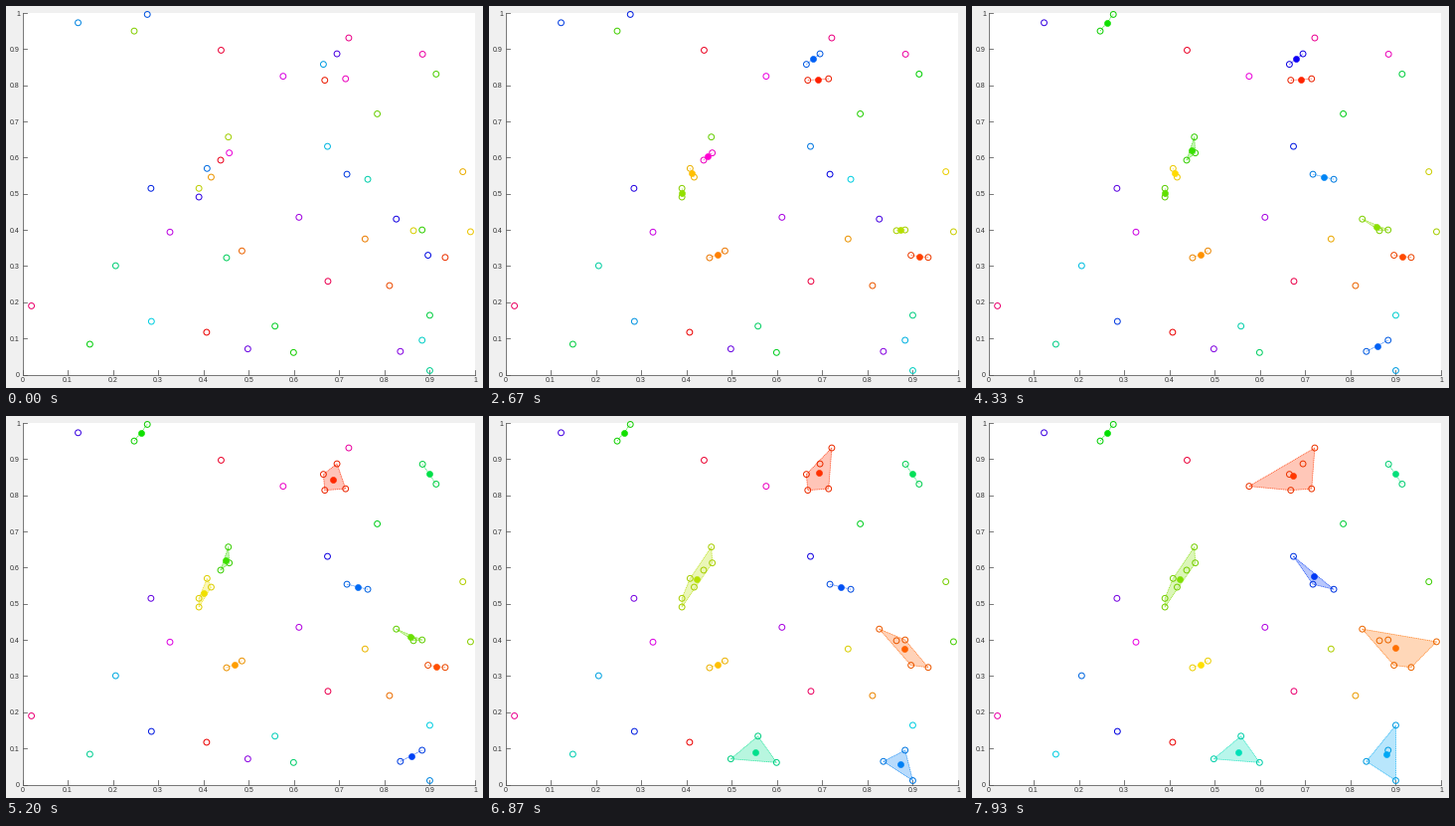
Animation of 480 by 384 pixels, one loop 8 s. Source, as a matplotlib script:

```python
import colorsys

import matplotlib.pyplot as plt
import numpy as np
from matplotlib.animation import FuncAnimation

W, H = 480, 384
LEFT, RIGHT, TOP, BOTTOM = 16.5, 472.0, 7.0, 370.5
LOOP_MS, STEP_MS = 8000, 50
FIRST_MS, MERGE_MS = 360, 285
MERGES = 26

# Sample points, ordered by their starting hue
POINTS = np.array([
    (.407, .117), (.668, .814), (.934, .324), (.811, .246), (.485, .342),
    (.757, .375), (.417, .546), (.973, .561), (.990, .395), (.864, .398),
    (.390, .515), (.455, .657), (.247, .950), (.784, .721), (.914, .831),
    (.883, .400), (.599, .061), (.149, .084), (.558, .134), (.900, .164),
    (.451, .323), (.206, .301), (.900, .011), (.763, .540), (.883, .095),
    (.285, .147), (.674, .631), (.665, .858), (.123, .973), (.408, .570),
    (.276, .996), (.717, .554), (.284, .515), (.896, .330), (.826, .430),
    (.390, .491), (.695, .887), (.498, .071), (.835, .064), (.611, .435),
    (.326, .394), (.576, .825), (.457, .613), (.714, .818), (.884, .886),
    (.721, .931), (.020, .190), (.675, .258), (.439, .897), (.438, .593),
])


def to_px(p):
    p = np.asarray(p, float)
    return np.column_stack((LEFT + p[:, 0] * (RIGHT - LEFT),
                            BOTTOM - p[:, 1] * (BOTTOM - TOP)))


def merge_closest(clusters):
    """Join the two clusters whose centroids are nearest."""
    mid = np.array([POINTS[c].mean(axis=0) for c in clusters])
    dist = np.hypot(*(mid[:, None] - mid[None]).transpose(2, 0, 1))
    np.fill_diagonal(dist, np.inf)
    a, b = sorted(np.unravel_index(dist.argmin(), dist.shape))
    joined = [list(c) for c in clusters]
    joined[a] += joined.pop(b)
    return joined


def half_hull(pts):
    out = []
    for p in pts:
        while len(out) > 1:
            (ax_, ay), (bx, by) = out[-2], out[-1]
            if (bx - ax_) * (p[1] - ay) - (by - ay) * (p[0] - ax_) > 0:
                break
            out.pop()
        out.append(p)
    return out[:-1]


def hull(pts):
    pts = sorted(map(tuple, pts))
    return np.array(half_hull(pts) + half_hull(pts[::-1]))


def hue_color(i, n, dim=1.0):
    r, g, b = colorsys.hsv_to_rgb(i / n, 1, 1)
    return (r * dim, g * .88 * dim, b * .96 * dim)


states = [[[i] for i in range(len(POINTS))]]
for _ in range(MERGES):
    states.append(merge_closest(states[-1]))

fig = plt.figure(figsize=(W / 72, H / 72), dpi=72, facecolor="#f0f0f0")
ax = fig.add_axes([0, 0, 1, 1])
ax.set_xlim(0, W)
ax.set_ylim(H, 0)
ax.axis("off")


def draw_axes():
    ax.fill([LEFT, RIGHT, RIGHT, LEFT], [TOP, TOP, BOTTOM, BOTTOM],
            color="white", lw=0, zorder=0)
    line = dict(color="#5a5a5a", lw=.8, zorder=1)
    ax.plot([LEFT, LEFT, RIGHT], [TOP, BOTTOM, BOTTOM], **line)
    ax.plot([0, W], [H - .5, H - .5], color="#8c8c8c", lw=1, zorder=1)
    text = dict(family="Liberation Sans", size=7, color="#303030")
    for k in range(11):
        label = f"{k / 10:g}"
        x, y = to_px([(k / 10, k / 10)])[0]
        ax.plot([x, x], [BOTTOM, BOTTOM - 4.5], **line)
        ax.plot([LEFT, LEFT + 4.5], [y, y], **line)
        ax.text(x, 376.8, label, ha="center", va="center", **text)
        ax.text(14, y, label, ha="right", va="center_baseline", **text)


draw_axes()
artists = []


def draw_cluster(members, i, n):
    pts = to_px(POINTS[members])
    color = hue_color(i, n)
    if len(members) > 1:
        shape = hull(pts)
        if len(shape) > 2:
            artists.extend(ax.fill(*shape.T, color=color, alpha=.28,
                                   lw=0, zorder=2))
        loop = np.vstack((shape, shape[:1])) if len(shape) > 2 else shape
        artists.extend(ax.plot(*loop.T, color=color, lw=.8, alpha=.8,
                               ls=(0, (1.5, .8)), zorder=3))
        mid = pts.mean(axis=0)
        artists.append(ax.scatter(*mid, s=38, color=[color], lw=.5, zorder=5))
    artists.append(ax.scatter(*pts.T, s=34, facecolors="none", lw=1,
                              edgecolors=[hue_color(i, n, .92)], zorder=4))


def update(frame):
    while artists:
        artists.pop().remove()
    done = (frame * STEP_MS - FIRST_MS) // MERGE_MS
    clusters = states[min(max(done, 0), MERGES)]
    for i, members in enumerate(clusters):
        draw_cluster(members, i, len(clusters))
    return artists


anim = FuncAnimation(fig, update, frames=LOOP_MS // STEP_MS,
                     interval=STEP_MS, repeat=True, repeat_delay=0,
                     init_func=lambda: update(0), blit=False)
plt.show()
```
